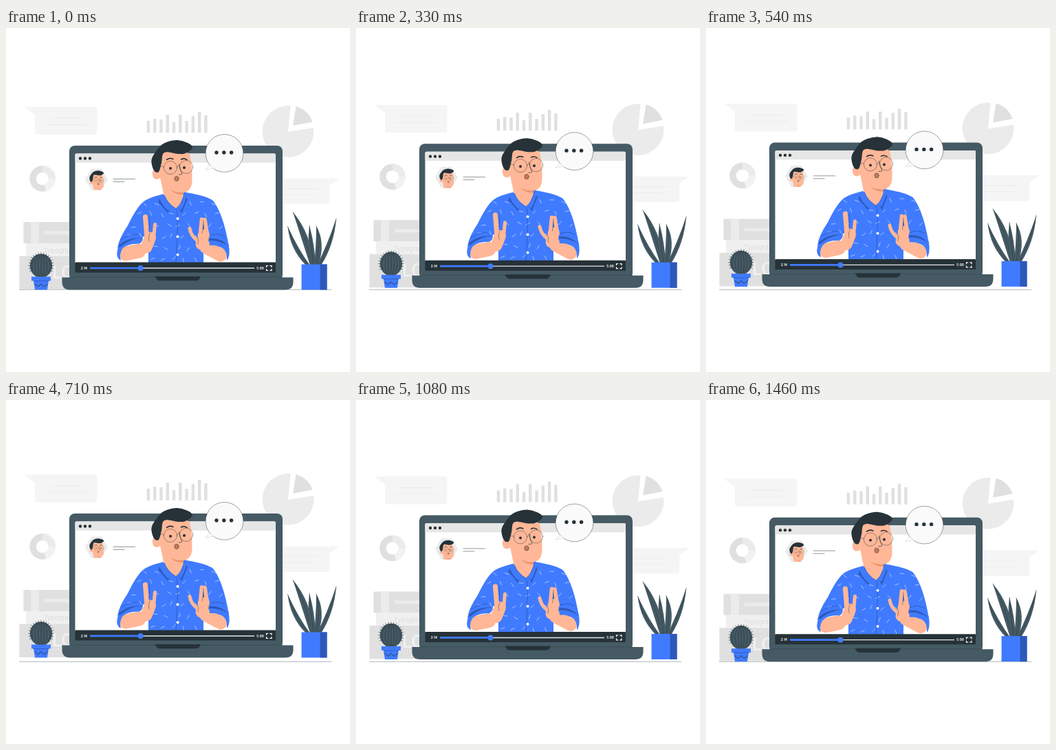
Animation, 500 px wide and 500 px high, one loop 1.5 s. Source, as an HTML page:

```html
<!DOCTYPE html>
<html lang="en">
<head>
<meta charset="utf-8">
<title>Video lesson</title>
<style>
html, body { margin: 0; width: 100%; height: 100%; overflow: hidden; background: #fff; }
svg { display: block; width: 100vw; height: 100vh; }
.line, .fold, .limb { fill: none; stroke: #263238; stroke-linecap: round; stroke-linejoin: round; }
.fold { stroke: #2a55b8; }
.limb { stroke: #ffb797; }
.grey { fill: none; stroke: #e6e6e6; }
.dark { fill: #263238; }
.slate { fill: #455a64; }
.blue { fill: #407bff; }
.shade { fill: #2e58b8; }
.skin { fill: #ffb797; }
</style>
</head>
<body>
<svg viewBox="0 0 500 500" stroke-width=".6" xmlns="http://www.w3.org/2000/svg">
  <defs>
    <clipPath id="hex"><path d="M115 220L124 204.500H139L148 220L139 235.500H124Z"/></clipPath>
    <clipPath id="shirtClip"><path id="shirt" d="M226 242Q206 247 199 253Q189 262 177 287Q164 306 162 320L207 300V341H287V318H324Q316 270 301 251Q292 244 262 239L247 262Z"/></clipPath>
  </defs>
  <path d="M19 380.300H473" stroke="#78868c" stroke-width=".6"/>

  <g id="scene">
    <!-- backdrop -->
    <path fill="#f5f5f5" d="M26 114.500H129Q132.500 114.500 132.500 118V151.500Q132.500 155 129 155H45.500Q42 155 42 151.500V126Z"/>
    <path fill="#f5f5f5" d="M395 218.500H484.500L470 229V252.500Q470 256 466.500 256H395Z"/>
    <path class="grey" d="M64 131H112M56 140.500H119M402 233.500H455M402 242.500H447"/>
    <g id="bars" fill="#e0e0e0"></g>
    <path fill="#ebebeb" d="M410 151L413.500 113.200A37.400 37.400 0 1 0 447 145Z"/>
    <path fill="#e0e0e0" d="M417 142L421.500 114A36 36 0 0 1 445.500 136.500Z"/>
    <g fill="none" stroke-width="9.500">
      <circle cx="53" cy="219" r="14" stroke="#e0e0e0"/>
      <path stroke="#ebebeb" d="M53 205A14 14 0 0 1 67 219"/>
      <path stroke="#f2f2f2" d="M67 219A14 14 0 0 1 57 232.500"/>
    </g>
    <rect x="25.500" y="282" width="70" height="31" rx="1.500" fill="#e0e0e0"/>
    <path fill="#ebebeb" d="M36 282H48V313H36ZM56 295H96V300H56Z"/>
    <rect x="29" y="313" width="67" height="18.500" fill="#f0f0f0"/>
    <text x="55" y="326.500" font-family="Inter, sans-serif" font-size="9.200" fill="#dcdcdc">Typography</text>
    <rect x="19.500" y="331.500" width="77" height="48.500" fill="#e0e0e0"/>
    <text x="67" y="364" font-family="Roboto, sans-serif" font-size="26" font-weight="500" fill="#f0f0f0">LO</text>

    <!-- laptop -->
    <rect class="slate" x="92" y="171" width="310" height="196" rx="8"/>
    <path class="slate" d="M81.500 362.500H417.500V369Q417.500 380.500 406 380.500H93Q81.500 380.500 81.500 369Z"/>
    <path d="M92 362.300H402" stroke="#37474f"/>
    <path class="dark" d="M216.500 361H283Q281 367.300 276 367.300H223.500Q219 367.300 216.500 361Z"/>
    <rect x="100.500" y="182.500" width="291.500" height="160" rx="2" fill="#fff"/>
    <rect x="100.500" y="182.500" width="291.500" height="13.300" rx="2" fill="#e6e6e6"/>
    <g id="windowDots" class="dark"></g>

    <g clip-path="url(#hex)">
      <rect x="113" y="203" width="37" height="34" fill="#ebebeb"/>
      <use href="#head" transform="translate(47.300 150.200) scale(.35)"/>
    </g>
    <path class="line" d="M156 219.500H187.500M156 223.500H172" stroke-width=".5"/>

    <!-- presenter -->
    <use class="blue" href="#shirt"/>
    <g id="dashes" clip-path="url(#shirtClip)" stroke="#fff" opacity=".85"></g>
    <path class="fold" stroke-width=".8" d="M249 268Q250 300 247 341M207 300Q210 285 208 275M287 318Q284 300 288 277"/>
    <g id="buttons" fill="#fff"></g>

    <g class="limb">
      <path stroke-width="21" d="M174 328L193 324"/>
      <path stroke-width="17" d="M204 319L209.500 305"/>
      <path stroke-width="7" d="M202.500 274.500L205 306"/>
      <path stroke-width="5" d="M216.500 285.500L214.500 306"/>
      <path stroke-width="19" d="M312 330L291 319"/>
      <path stroke-width="17" d="M284 314L287.500 301"/>
      <path stroke-width="5.500" d="M284.500 278L282 303M289 278.500L293 303"/>
      <path stroke-width="5" d="M267 291.500Q269 302 277 308"/>
    </g>
    <path class="line" stroke-width=".45" d="M209 298Q206 304 208 310M287 280Q287 290 285.500 298M278 302Q281 308 279 314"/>
    <path class="blue" d="M162 323Q164 308 182 303Q191 300 199 304Q199 311 194 313.500Q176 313 169 321Q164 330 167 338Q159 334 162 323Z"/>
    <path class="blue" d="M294.500 304Q306 300 316 304Q324 309 324.500 321Q325.500 333 321 338Q322 326 316 321Q307 315 296 316Z"/>
    <path class="shade" d="M164 316Q176 304 198 305Q180 306 165 319ZM295 306Q312 304 323 317Q310 308 295 309Z"/>
    <path class="fold" stroke-width=".8" d="M167 308Q179 299 191 300M296 302Q308 297 318 303"/>

    <g id="head">
      <path class="skin" d="M222 207L230 246Q238 257 247 263Q257 254 259 236Z"/>
      <path fill="#eb9470" d="M238 234Q246 240 259 238.500L258.500 242Q247 243.500 238 234Z"/>
      <path class="skin" d="M225 184Q245 171 267 183Q271 200 270.500 223Q269.500 238 257 239Q246 240 236 232L224 218Q217 223 213.500 216Q211 207 217 205Q221 205 223 209Z"/>
      <path id="hair" class="dark"/>
      <path class="line" stroke-width="1.600" d="M233.500 191.500Q238 188 243 190.500M254.500 191Q258.500 188.500 263 191.500"/>
      <g class="dark"><circle cx="239" cy="204" r="2"/><circle cx="259" cy="203" r="2"/></g>
      <g class="line" stroke-width=".45">
        <circle cx="239" cy="203" r="9.600"/><circle cx="262" cy="202" r="9.600"/>
        <path d="M248.500 202Q250 199.500 252.500 201M229.500 202L222 200"/>
        <path stroke-width=".7" d="M251.500 198Q253 206 256 212Q254 214 251 213"/>
        <ellipse cx="248" cy="219" rx="3.200" ry="3.600" fill="#c67a5c"/>
      </g>
    </g>
    <path class="blue" d="M227 241L221.500 253L235.500 269L247 262.500Q234 254 230.500 243ZM247 262.500L255.500 269L263.500 249L261.500 238L258.500 239Q257.500 255 247 262.500Z"/>
    <path class="shade" d="M221.500 253L235.500 269L238 263L236 266Q226 257 223.500 248ZM255.500 269L263.500 249L262 246Q259 258 254.500 265L251 261Z"/>
    <path class="fold" d="M230.500 244Q235 256 247 262.500Q257 255 258.800 240M247 262.500L249 268"/>

    <!-- player -->
    <rect class="dark" x="100.500" y="340.500" width="291.500" height="15" rx="1"/>
    <g font-family="Inter, sans-serif" font-size="4.600" font-weight="700" fill="#fff">
      <text x="108.700" y="350.600">2:14</text><text x="364.300" y="350.600">5:00</text>
    </g>
    <path d="M195 349H361" stroke="#e6e6e6" stroke-width="1.400"/>
    <path d="M122 349H195" stroke="#407bff" stroke-width="2.700"/>
    <circle class="blue" cx="195.500" cy="349" r="4"/>
    <rect x="378.500" y="345.500" width="7.500" height="7" fill="none" stroke="#fff" stroke-width="1.200"/>
    <path d="M382.250 344V354M377 349H388" stroke="#263238" stroke-width="2.200"/>

    <!-- speech bubble -->
    <circle cx="317.500" cy="182" r="27.400" fill="#fafafa" stroke="#263238" stroke-width=".45"/>
    <path fill="#fafafa" stroke="#d0d0d0" stroke-width=".5" d="M295.500 199L289.500 206.500L302 204"/>
    <g id="typingDots" class="dark"></g>

    <!-- plants -->
    <ellipse class="slate" cx="51" cy="345.500" rx="16.300" ry="17.300"/>
    <g id="cactus" class="line"></g>
    <path class="blue" d="M37 361.500H65V367.500H62L60 380.500H42L40 367.500H37Z"/>
    <path class="shade" d="M40 367.300H62V368.200H40Z"/>
    <path class="line" d="M42 372l4.500 4l4.500 -4l4.500 4l4.500 -4" stroke-width=".9"/>
    <g id="leaves"></g>
    <rect class="blue" x="429.500" y="343.500" width="37" height="37"/>
    <rect class="shade" x="456.500" y="343.500" width="10" height="37"/>
  </g>
</svg>
<script>
const $ = id => document.getElementById(id);
const repeat = (id, n, draw) => { $(id).innerHTML = Array.from({ length: n }, (_, i) => draw(i)).join(""); };
const dot = (x, y, r) => `<circle cx="${x}" cy="${y}" r="${r}"/>`;

let seed = 7;
const random = () => (seed = seed * 16807 % 2147483647) / 2147483647;

// Closed smooth curve through the given points.
function spline(points) {
  const at = i => points[(i + points.length) % points.length];
  const mix = (p, a, b) => p.map((v, k) => v + (b[k] - a[k]) / 6);
  return "M" + at(0) + points.map((p, i) =>
    `C${mix(p, at(i - 1), at(i + 1))} ${mix(at(i + 1), at(i + 2), p)} ${at(i + 1)}`).join("") + "Z";
}

$("hair").setAttribute("d", spline([
  [215, 207], [211.5, 192], [219, 178], [229, 168], [247, 163], [264, 167],
  [271, 174], [261, 182], [250, 183], [230, 181], [226, 196], [222, 209]
]));

repeat("windowDots", 3, i => dot(108 + 7 * i, 189.5, 2.2));
repeat("typingDots", 3, i => dot(306 + 10.8 * i, 181, 2.7));
repeat("buttons", 3, i => dot(249.5, 277 + 26.2 * i, 2));

const heights = [17, 20, 19, 26, 15, 26, 17, 24, 30, 25];
repeat("bars", heights.length, i =>
  `<rect x="${204.7 + i * 9.27}" y="${152 - heights[i]}" width="4.5" height="${heights[i]}"/>`);

// Shirt pattern: short strokes on a loose, staggered grid.
repeat("dashes", 60, i => {
  const row = Math.floor(i / 10);
  const x = 168 + (i % 10 + row % 2 / 2) * 16 + random() * 6;
  const y = 252 + row * 16 + random() * 6;
  return `<path d="M-3.3 0H3.3" transform="translate(${x} ${y}) rotate(${random() * 150 - 75})"/>`;
});

repeat("cactus", 26, i => {
  if (i < 7) {
    const bend = (i - 3) * 7;
    return `<path d="M${51 + bend / 4} 329.5Q${51 + bend} 345 ${51 + bend / 3} 361.500"/>`;
  }
  const a = Math.PI * (.86 + (i - 7) * 1.28 / 18);
  const at = k => `${51 + Math.cos(a) * (16 + k)} ${345.5 + Math.sin(a) * (17 + k)}`;
  return `<path d="M${at(-1)}L${at(2.2)}"/>`;
});

// tip, bend, foot, half width
const leaves = [
  [417, 267.5, 435, 298, 445, 8], [409.5, 288.5, 419, 322, 439, 6], [441, 287, 443, 316, 447, 6],
  [480, 277, 472, 315, 455, 5], [451, 288, 458, 312, 451, 7]
];
repeat("leaves", leaves.length, i => {
  const [x, y, cx, cy, foot, w] = leaves[i];
  return `<path class="slate" d="M${x} ${y}Q${cx - w} ${cy} ${foot - 3} 345H${foot + 3}Q${cx + w} ${cy} ${x} ${y}Z"/>` +
    `<path class="line" stroke-width=".5" d="M${x} ${y}Q${cx} ${cy} ${foot} 345"/>`;
});

const LOOP = 1500, STEPS = 36, RISE = 6.4;

function draw(ms) {
  const phase = Math.floor((ms + 5) % LOOP / LOOP * STEPS) / STEPS;
  const lift = RISE * (1 - Math.abs(1 - 2 * phase));
  $("scene").setAttribute("transform", `translate(0 ${-lift.toFixed(3)})`);
}

function tick() {
  draw(performance.now());
  requestAnimationFrame(tick);
}
tick();
</script>
</body>
</html>
```
